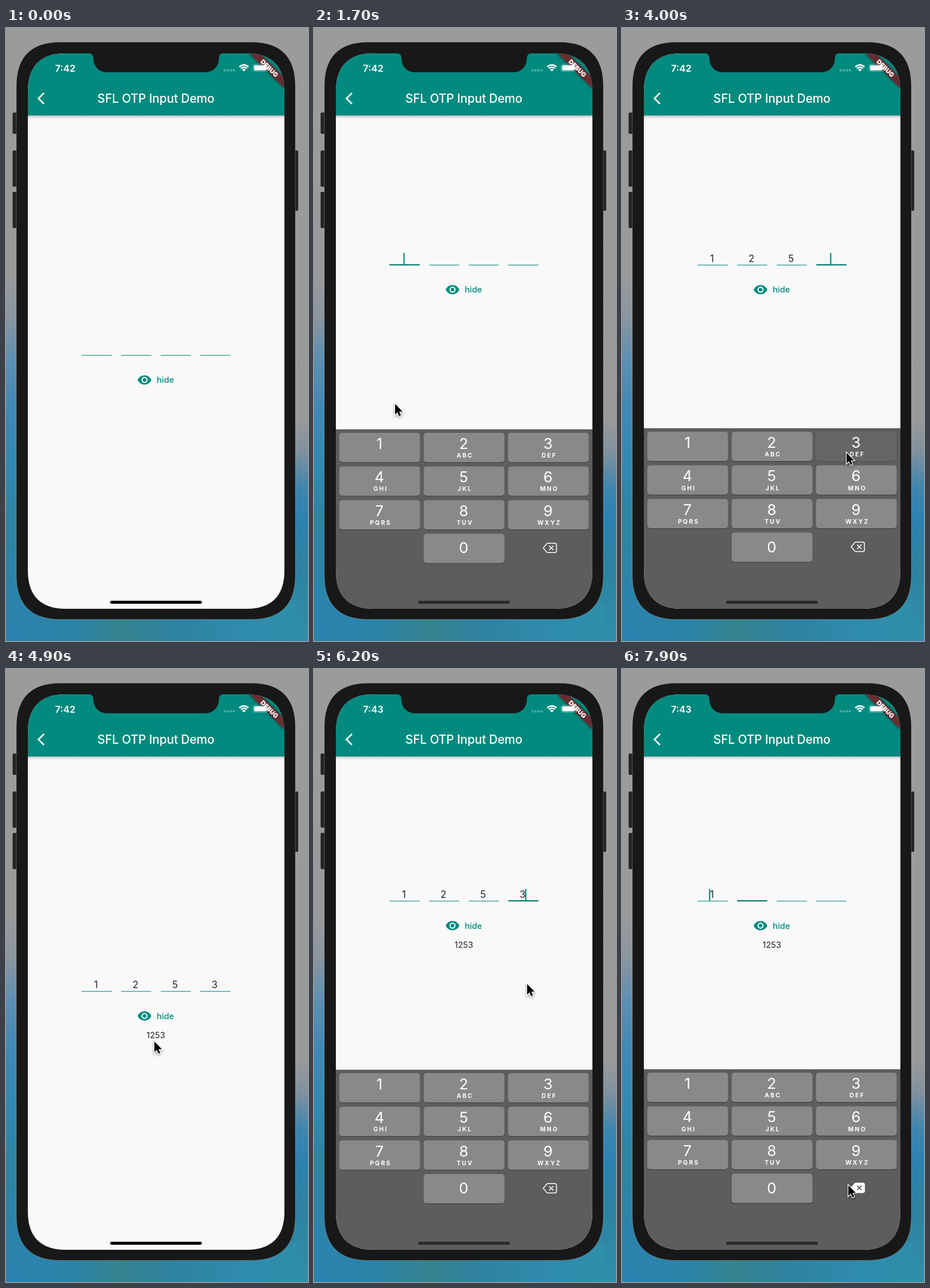
Recreate the animation shown at these times as an HTML page with a canvas. Size 525 px wide and 1066 px high, loop 8000 ms.

```html
<!DOCTYPE html>
<html lang="en">
<head>
<meta charset="utf-8">
<title>OTP input</title>
<style>
html, body { margin: 0; width: 100%; height: 100%; overflow: hidden; background: #9a9a9a; }
canvas { display: block; width: 525px; height: 1066px; }
</style>
</head>
<body>
<canvas id="stage" width="525" height="1066"></canvas>
<script>
const ctx = document.getElementById('stage').getContext('2d');
const LOOP = 8000, STEP = 100;
const TEAL = '#028a7e', BEZEL = '#181818';
const FONT = 'Inter, Roboto, sans-serif';
const SCREEN = { x: 38, y: 44, w: 446, h: 966 };
const KEYBOARD_TOP = 696, KEYBOARD_H = 314;
const SHOW_1 = 1300, HIDE = 4200, SHOW_2 = 5750, CLOCK_TICK = 5500;

// time, digits, focused field (-1 for none), caret side
const INPUT = [
  [0, '', -1], [SHOW_1, '', 0], [2100, '1', 1], [2800, '12', 2], [3600, '125', 3],
  [HIDE, '1253', -1], [SHOW_2, '1253', 3, 'after'],
  [6900, '125', 2, 'before'], [7400, '12', 1, 'before'], [7900, '1', 0, 'before']
];
// key, down, up
const PRESSES = [
  ['1', 2000, 2100], ['2', 2700, 2800], ['5', 3500, 3600], ['3', 3900, 4100],
  ['del', 6900, 7000], ['del', 7400, 7500], ['del', 7900, 8000]
];
// time, x, y
const POINTER = [
  [600, -20, 640], [1200, 150, 562], [1300, 150, 562], [1700, 140.5, 653], [2000, 108, 722],
  [2150, 108, 722], [2600, 235, 743], [3100, 235, 743], [3450, 262, 790], [3600, 262, 790],
  [3900, 390, 738], [4200, 390, 738], [4900, 257.5, 647], [5000, 330, 582], [5100, 366, 560],
  [5200, 366, 560], [5700, 366, 552], [6200, 370, 547], [6800, 393, 897], [8000, 393, 897]
];
const LETTERS = ['', 'ABC', 'DEF', 'GHI', 'JKL', 'MNO', 'PQRS', 'TUV', 'WXYZ'];

function text(str, x, y, size, weight, color, spacing = 0, align = 'center') {
  ctx.font = `${weight} ${size}px ${FONT}`;
  ctx.letterSpacing = spacing + 'px';
  ctx.textAlign = align;
  ctx.fillStyle = color;
  ctx.fillText(str, x, y);
}

function box(x, y, w, h, r, color) {
  ctx.fillStyle = color;
  ctx.beginPath();
  ctx.roundRect(x, y, w, h, r);
  ctx.fill();
}

function gradient(x0, y0, x1, y1, stops) {
  const g = ctx.createLinearGradient(x0, y0, x1, y1);
  stops.forEach(([at, color]) => g.addColorStop(at, color));
  return g;
}

// Rounded box with continuous corners
function squircle(x, y, w, h, e) {
  const c = e * 0.34, r = x + w, b = y + h;
  ctx.beginPath();
  ctx.moveTo(x + e, y);
  ctx.lineTo(r - e, y);
  ctx.bezierCurveTo(r - c, y, r, y + c, r, y + e);
  ctx.lineTo(r, b - e);
  ctx.bezierCurveTo(r, b - c, r - c, b, r - e, b);
  ctx.lineTo(x + e, b);
  ctx.bezierCurveTo(x + c, b, x, b - c, x, b - e);
  ctx.lineTo(x, y + e);
  ctx.bezierCurveTo(x, y + c, x + c, y, x + e, y);
  ctx.closePath();
}

function wallpaper() {
  ctx.fillStyle = gradient(0, 0, 0, 1066, [
    [0, '#9b9b9b'], [0.4, '#999a9b'], [0.47, '#8b969e'], [0.54, '#5d8fb2'], [0.62, '#3f89b4'],
    [0.72, '#2f8ab0'], [0.8, '#2d84a2'], [0.9, '#2b84a8'], [1, '#2a84b0']]);
  ctx.fillRect(0, 0, 262, 1066);
  ctx.fillStyle = gradient(0, 0, 0, 1066, [
    [0, '#9b9b9b'], [0.64, '#999a9b'], [0.69, '#80919d'], [0.75, '#3f86ae'],
    [0.8, '#2c82b2'], [0.88, '#2d839f'], [1, '#2f8fac']]);
  ctx.fillRect(262, 0, 263, 1066);
  ctx.fillStyle = gradient(0, 0, 525, 0, [
    [0, '#2a84b0'], [0.22, '#2b83a6'], [0.38, '#35838f'], [0.55, '#2f82a0'], [0.75, '#2f8aab'], [1, '#2f8fac']]);
  ctx.fillRect(19, 1000, 487, 66);
}

function phoneBody() {
  [[147, 37], [213, 63], [285, 63]].forEach(([y, h]) => box(11.5, y, 9, h, 2, '#242424'));
  box(500, 213, 8, 105, 2, '#242424');
  squircle(18, 24.5, 485, 1004, 76);
  ctx.fillStyle = BEZEL;
  ctx.fill();
  ctx.strokeStyle = 'rgba(190,190,190,.45)';
  ctx.lineWidth = 0.8;
  ctx.stroke();
}

function notch() {
  ctx.fillStyle = BEZEL;
  ctx.beginPath();
  ctx.moveTo(144, 43);
  ctx.lineTo(144, 44);
  ctx.quadraticCurveTo(152, 44, 152, 53);
  ctx.arcTo(152, 77, 175, 77, 23);
  ctx.lineTo(347, 77);
  ctx.arcTo(370, 77, 370, 53, 23);
  ctx.lineTo(370, 53);
  ctx.quadraticCurveTo(370, 44, 378, 44);
  ctx.lineTo(378, 43);
  ctx.fill();
}

function header() {
  ctx.fillStyle = gradient(0, 152, 0, 159, [[0, 'rgba(0,0,0,.28)'], [0.4, 'rgba(0,0,0,.09)'], [1, 'rgba(0,0,0,0)']]);
  ctx.fillRect(38, 152, 446, 7);
  ctx.fillStyle = TEAL;
  ctx.fillRect(38, 44, 446, 108);
  ctx.strokeStyle = '#fff';
  ctx.lineWidth = 2.8;
  ctx.beginPath();
  ctx.moveTo(66, 113);
  ctx.lineTo(56.5, 122.5);
  ctx.lineTo(66, 132);
  ctx.stroke();
  text('SFL OTP Input Demo', 260.5, 130, 20.8, 500, '#fff', -0.1);
}

function ribbon() {
  ctx.save();
  ctx.translate(484, 44);
  ctx.rotate(Math.PI / 4);
  ctx.scale(1.077, 1.077);
  ctx.shadowColor = 'rgba(0,0,0,.5)';
  ctx.shadowBlur = 6;
  ctx.fillStyle = '#672d31';
  ctx.fillRect(-40, 28, 80, 12);
  ctx.shadowColor = 'transparent';
  text('DEBUG', 0, 37.8, 10.2, 900, '#fff');
  ctx.restore();
}

function statusBar(t) {
  text(t < CLOCK_TICK ? '7:42' : '7:43', 103, 75.5, 16.5, 600, '#fff');
  ctx.fillStyle = 'rgba(255,255,255,.3)';
  for (let i = 0; i < 4; i++) {
    ctx.beginPath();
    ctx.arc(380.3 + i * 5.2, 73.7, 2.1, 0, 7);
    ctx.fill();
  }
  // Wi-Fi fan
  ctx.strokeStyle = ctx.fillStyle = '#fff';
  ctx.lineWidth = 2.4;
  const a = Math.PI / 4;
  [11.2, 7.3].forEach(r => {
    ctx.beginPath();
    ctx.arc(413.5, 75.5, r, -3 * a, -a);
    ctx.stroke();
  });
  ctx.beginPath();
  ctx.moveTo(413.5, 75.5);
  ctx.arc(413.5, 75.5, 4.4, -3 * a, -a);
  ctx.fill();
  // Battery
  ctx.strokeStyle = 'rgba(255,255,255,.4)';
  ctx.lineWidth = 1;
  ctx.beginPath();
  ctx.roundRect(429.5, 63, 25.5, 12.5, 3.5);
  ctx.stroke();
  box(431.2, 64.7, 22, 9.1, 2, '#fff');
  box(456, 67, 1.5, 4.5, 1, 'rgba(255,255,255,.4)');
}

function inputAt(t) {
  return INPUT.filter(s => s[0] <= t).pop() || INPUT[0];
}

function form(t, open) {
  const [since, digits, focus, side] = inputAt(t);
  const lined = inputAt(t - STEP)[2];
  const done = t >= HIDE;
  const y = 569.3 - (done ? 8.7 : 0) - (open ? KEYBOARD_H / 2 : 0);
  for (let i = 0; i < 4; i++) {
    const x = 131.3 + i * 68.8, mid = x + 25;
    if (lined === i) {
      ctx.fillStyle = '#06776d';
      ctx.fillRect(x, y - 1.6, 52.5, 2.2);
    } else {
      ctx.fillStyle = '#3ba29b';
      ctx.fillRect(x, y - 0.7, 52.5, 1.4);
    }
    if (digits[i]) text(digits[i], mid, y - 5.2, 16.6, 400, '#222');
    if (focus === i && (t - since) % 1000 < 500) {
      const shift = side === 'after' ? 5.3 : side === 'before' ? -4 : 0;
      ctx.fillStyle = '#0a877c';
      ctx.fillRect(mid + shift - 1, y - 21, 2.2, 20.5);
    }
  }
  // Eye
  const ex = 240.8, ey = y + 42.7;
  ctx.save();
  ctx.translate(ex, ey);
  ctx.scale(1.077, 1.077);
  ctx.fillStyle = TEAL;
  ctx.beginPath();
  ctx.moveTo(0, -7.5);
  ctx.bezierCurveTo(-5, -7.5, -9.27, -4.39, -11, 0);
  ctx.bezierCurveTo(-9.27, 4.39, -5, 7.5, 0, 7.5);
  ctx.bezierCurveTo(5, 7.5, 9.27, 4.39, 11, 0);
  ctx.bezierCurveTo(9.27, -4.39, 5, -7.5, 0, -7.5);
  [5, 3].forEach(r => { ctx.moveTo(r, 0); ctx.arc(0, 0, r, 0, 7); });
  ctx.fill('evenodd');
  ctx.restore();
  text('hide', 277, y + 47.9, 14.7, 500, TEAL);
  if (done) text('1253', 260.5, y + 81.5, 14.5, 400, '#222');
}

function deleteKey(y, pressed) {
  ctx.beginPath();
  ctx.moveTo(398.5, y);
  ctx.lineTo(404.6, y - 7.3);
  ctx.quadraticCurveTo(405.5, y - 8.2, 407, y - 8.2);
  ctx.lineTo(418.5, y - 8.2);
  ctx.quadraticCurveTo(421.5, y - 8.2, 421.5, y - 5.2);
  ctx.lineTo(421.5, y + 5.2);
  ctx.quadraticCurveTo(421.5, y + 8.2, 418.5, y + 8.2);
  ctx.lineTo(407, y + 8.2);
  ctx.quadraticCurveTo(405.5, y + 8.2, 404.6, y + 7.3);
  ctx.closePath();
  ctx.lineWidth = 1.5;
  ctx.strokeStyle = ctx.fillStyle = '#fff';
  if (pressed) ctx.fill();
  ctx.stroke();
  ctx.strokeStyle = pressed ? '#4a4a4a' : '#fff';
  ctx.beginPath();
  ctx.moveTo(408.8, y - 3.8);
  ctx.lineTo(416.4, y + 3.8);
  ctx.moveTo(416.4, y - 3.8);
  ctx.lineTo(408.8, y + 3.8);
  ctx.stroke();
}

function keyboard(top, pressed) {
  ctx.fillStyle = '#5d5d5d';
  ctx.fillRect(38, top, 446, KEYBOARD_H);
  for (let i = 0; i < 10; i++) {
    const zero = i === 9, label = String((i + 1) % 10);
    const col = zero ? 1 : i % 3, row = Math.floor(i / 3);
    const x = 44 + col * 146.6, y = top + 6 + row * 58.5, mid = x + 70;
    const down = pressed === label;
    box(x, y + 1.2, 140.4, 51, 5, down ? '#585858' : '#404040');
    box(x, y, 140.4, 51, 5, down ? '#666' : '#898989');
    text(label, mid - 0.3, y + (zero ? 34 : 27.7), 26, 400, '#fff');
    if (LETTERS[i]) text(LETTERS[i], mid + 1.8, y + 43, 10.4, 700, '#fff', 2.2);
  }
  deleteKey(top + 206.2, pressed === 'del');
}

// Share of the keyboard still hidden, sliding on a critically damped spring
function hiddenShare(t) {
  const settle = start => {
    const k = Math.max(0, t - start) * 0.018;
    return Math.exp(-k) * (1 + k);
  };
  if (t < SHOW_1) return 1;
  if (t < HIDE) return settle(SHOW_1);
  return t < SHOW_2 ? 1 - settle(HIDE) : settle(SHOW_2);
}

function pointer(t) {
  const i = POINTER.findIndex(p => p[0] > t);
  if (i < 1) return;
  const [t0, x0, y0] = POINTER[i - 1], [t1, x1, y1] = POINTER[i];
  const u = (t - t0) / (t1 - t0), e = u * u * (3 - 2 * u);
  ctx.save();
  ctx.translate(x0 + (x1 - x0) * e, y0 + (y1 - y0) * e);
  ctx.scale(1.12, 1.12);
  ctx.beginPath();
  ctx.moveTo(0.4, 0.6);
  [[0.4, 17.2], [4.1, 13.7], [6.7, 19.6], [9.4, 18.4], [6.9, 12.6], [12, 12.4]].forEach(p => ctx.lineTo(...p));
  ctx.closePath();
  ctx.lineWidth = 2.2;
  ctx.strokeStyle = '#fff';
  ctx.shadowColor = 'rgba(0,0,0,.4)';
  ctx.shadowBlur = 4;
  ctx.shadowOffsetY = 2;
  ctx.stroke();
  ctx.shadowColor = 'transparent';
  ctx.fillStyle = '#000';
  ctx.fill();
  ctx.restore();
}

function draw(t) {
  const hidden = hiddenShare(t);
  const open = (t >= SHOW_1 && t < HIDE) || t >= SHOW_2;
  const press = PRESSES.find(p => t >= p[1] && t < p[2]);
  wallpaper();
  phoneBody();
  ctx.save();
  squircle(SCREEN.x, SCREEN.y, SCREEN.w, SCREEN.h, 66);
  ctx.clip();
  ctx.fillStyle = '#f9f9f9';
  ctx.fillRect(SCREEN.x, SCREEN.y, SCREEN.w, SCREEN.h);
  header();
  form(t, open);
  ribbon();
  statusBar(t);
  if (hidden < 0.999) keyboard(KEYBOARD_TOP + KEYBOARD_H * hidden, press && press[0]);
  box(181, 996, 159.5, 5.2, 2.6, hidden < 0.9 ? '#2a2a2a' : '#000');
  ctx.restore();
  notch();
  pointer(t);
}

function tick() {
  const t = performance.now() % LOOP;
  draw(Math.floor(t / STEP) * STEP);
  requestAnimationFrame(tick);
}
tick();
</script>
</body>
</html>
```
